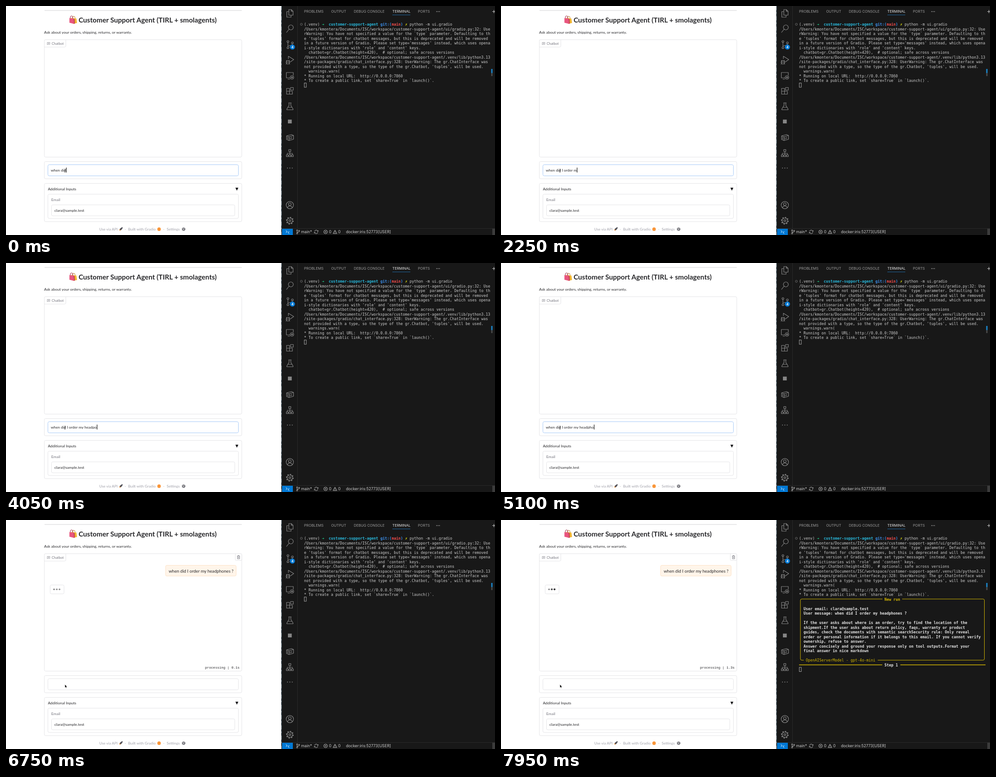
An HTML page that plays this animation: 1091x513 px, repeating every 8 s.

```html
<!DOCTYPE html>
<html lang="en">
<head>
<meta charset="utf-8">
<title>Support agent demo</title>
<style>
  html, body { margin: 0; width: 100%; height: 100%; overflow: hidden; background: #fff; }
  svg { display: block; }
  text { white-space: pre; }
  .page { font: 8.45px Lato, sans-serif; fill: #27272a; }
  .page .muted { fill: #71717a; }
  .page .foot { font-size: 8.3px; fill: #a1a1aa; }
  .box { fill: #fff; stroke: #e4e4e7; }
  .ui { font: 8px Inter, sans-serif; fill: #9d9d9d; }
  .status { font-size: 8.7px; fill: #ccc; }
  .icon { fill: none; stroke: #868686; stroke-width: 1.2; stroke-linejoin: round; stroke-linecap: round; }
  .term { font: 8.32px "DejaVu Sans Mono", monospace; fill: #ccc; }
  .b { font-weight: bold; }
  .white { fill: #e5e5e5; }
  .gold { fill: #d4b702; }
  .green { fill: #23d18b; }
  .cyan { fill: #29b8db; }
  .blue { fill: #3b8eea; }
  .red { fill: #f14c4c; }
  .yellow { fill: #e5e510; }
</style>
</head>
<body>
<svg width="1091" height="513" viewBox="0 0 1091 513">
  <rect width="614" height="513" fill="#fff"/>

  <g class="page">
    <path d="M86 10H526" stroke="#d0d0d3"/>
    <g>
      <path d="M148 28v-2a3 3 0 0 1 6 0v2" fill="none" stroke="#b97d1d"/>
      <path d="M145 27l12 1 1.500 10-9 2z" fill="#f2b632"/>
      <path d="M143.500 28v-3a2.800 2.800 0 0 1 5.600 0v4" fill="none" stroke="#9b2c4a"/>
      <path d="M141.500 27l9.500 1.500 1 11.500-10.500-2.500z" fill="#e8557f"/>
      <path d="M151 28.500l2 1 .5 10-1.500.5z" fill="#b52f55"/>
    </g>
    <text class="b" x="162" y="36.700" font-size="15.480">Customer Support Agent (TIRL + smolagents)</text>
    <text x="85" y="61.600">Ask about your orders, shipping, returns, or warranty.</text>

    <rect class="box" x="85.500" y="75.500" width="440.500" height="263" rx="3"/>
    <path class="box" d="M85.500 92V78.500a3 3 0 0 1 3-3h45v13.500a3 3 0 0 1-3 3z"/>
    <path d="M92 81.500h6v4.500h-4.500l-1.500 1zM93.500 83h3M93.500 84.500h3" fill="none" stroke="#8b8b93" stroke-width=".7"/>
    <text class="muted" x="102" y="86.900" font-size="7.500">Chatbot</text>

    <rect class="box" x="85.500" y="348.500" width="440.500" height="38.500" rx="3"/>
    <rect class="box" id="field" x="93.500" y="355.500" width="425" height="25" rx="3"/>
    <g id="typing">
      <text id="typed" x="100" y="371" font-size="8.360"></text>
      <rect id="caret" y="362" width="1.100" height="11" fill="#000"/>
      <path d="M130 365q1.500 0 1.500 1.200v5.600q0 1.200-1.500 1.200M133 365q-1.500 0-1.500 1.200v5.600q0 1.200 1.500 1.200M130.700 369.500h1.600" fill="none" stroke="#333" stroke-width=".6"/>
    </g>

    <rect class="box" x="85.500" y="397.500" width="440.500" height="85.500" rx="3"/>
    <text x="93.500" y="413.200">Additional Inputs</text>
    <path d="M511.800 407h6.600l-3.300 6.800z" fill="#18181b"/>
    <rect class="box" x="93.500" y="421.500" width="425" height="54.500" rx="3"/>
    <text class="muted" x="101" y="437">Email</text>
    <rect class="box" x="101.500" y="445.500" width="409" height="24.500" rx="3"/>
    <text x="108" y="461">clara@sample.test</text>

    <text class="foot" x="208" y="503">Use via API</text>
    <path d="M253 503l1-4 4-3 2.500-.5-.5 2.500-3 4z" fill="#55555c"/>
    <path d="M253 503l.5-3 2.500 2.500z" fill="#f08a24"/>
    <text class="foot" x="265" y="503">·</text>
    <text class="foot" x="272.500" y="503">Built with Gradio</text>
    <circle cx="341.500" cy="500" r="3.900" fill="#f9963a"/>
    <text class="foot" x="351" y="503">·</text>
    <text class="foot" x="358.500" y="503">Settings</text>
    <circle cx="396.300" cy="500" r="3.400" fill="none" stroke="#66666d" stroke-width="1.300" stroke-dasharray="1.600 1.070"/>
    <circle cx="396.300" cy="500" r="2" fill="none" stroke="#66666d" stroke-width="1.700"/>

    <g id="chat">
      <rect class="box" x="511.500" y="75.500" width="14.500" height="15" rx="2"/>
      <path d="M515.500 80.800h6.500M517.500 80.500v-1h2.500v1M516.300 81v6h5v-6M518 82.500v3M519.700 82.500v3" fill="none" stroke="#71717a" stroke-width=".8"/>
      <rect x="356" y="101.500" width="157.500" height="24" rx="3" fill="#fff5ea" stroke="#fde2c6"/>
      <text x="363" y="118.300" font-size="9.620">when did I order my headphones ?</text>
      <rect class="box" x="98.500" y="145.500" width="31" height="20" rx="3"/>
      <g id="dots" fill="#27272a">
        <circle cx="107.200" cy="155.300" r="2"/><circle cx="113.300" cy="155.300" r="2"/><circle cx="119.400" cy="155.300" r="2"/>
      </g>
      <text id="timer" x="521" y="333" text-anchor="end" style="font:7.550px 'Liberation Mono',monospace"></text>
      <path d="M131.500 368.500v7l1.600-1.400 1 2.300 1.100-.5-1-2.200h2.100z" fill="#000" stroke="#fff" stroke-width=".4"/>
    </g>
  </g>

  <rect x="614" width="477" height="513" fill="#181818"/>
  <path d="M615 0V513" stroke="#2a343a" stroke-width="2"/>
  <path d="M614.500 0V513" stroke="#7d878c" stroke-dasharray="9 5 3 6"/>
  <path d="M650.500 0V498.500M616 498.500H1091" stroke="#2b2b2b" fill="none"/>

  <g class="icon">
    <path d="M631 8h5.500l4 4v8.500H631zM636.500 8v4h4M631 12.500h-4.500V25h9.500v-4.500"/>
    <path d="M632 51.500L626 59M641 48a5.500 5.500 0 1 1-11 0a5.500 5.500 0 1 1 11 0"/>
    <path d="M629 82v8M639 84.500q0 4-5 4t-5 3M631 79.500a2 2 0 1 1-4 0a2 2 0 1 1 4 0M631 93.500a2 2 0 1 1-4 0a2 2 0 1 1 4 0M641 82.500a2 2 0 1 1-4 0a2 2 0 1 1 4 0"/>
    <path d="M630 118v-5.500l12 7.500-8 5.500M625.500 125.500a3.500 3.500 0 0 1 7 0v1a3.500 3.500 0 0 1-7 0zM625.500 122l1.500 1.500M632.500 122l-1.500 1.500M624.500 126h8.500M625 130l1.500-1.500M633 130l-1.500-1.500"/>
    <path d="M633 161h-7.500v-12h15.500v6M629 164h4M642 160a4 4 0 1 1-8 0a4 4 0 1 1 8 0M636.500 158.500l1.300 1.500-1.300 1.500M639.800 158.500l-1.300 1.500 1.300 1.500"/>
    <path d="M626 184.500h6.500v13H626zM626 191h13v6.500h-13M635 182.500h6v6h-6z"/>
    <path d="M630.500 217h6M631.500 217v5.500l-5 8.500q-.5 1.500 1 1.500h12q1.500 0 1-1.500l-5-8.500V217M629 227h9"/>
    <path d="M626 291l11-3 4.500 2v8.500l-10 3-5.500-2.500zM626 291l5.500 2 10-3M631.500 293v8.500M628.500 294v4M634 295v3.500M637 294v3.500"/>
    <path d="M631 321.500h4.500v4.500H631zM625.500 333.500h4v4h-4zM631.300 333.500h4v4h-4zM637 333.500h4v4h-4zM633.300 326v7.500M627.500 333.500v-3.500H639v3.500"/>
    <path d="M641.500 446a8.200 8.200 0 1 1-16.400 0a8.200 8.200 0 1 1 16.400 0M636.300 444a3 3 0 1 1-6 0a3 3 0 1 1 6 0M628 452q1-4 5.300-4t5.300 4"/>
    <circle cx="633.300" cy="481" r="2.200"/>
    <circle cx="633.300" cy="481" r="6"/>
    <circle cx="633.300" cy="481" r="7.500" stroke-width="2" stroke-dasharray="2.800 3.090" stroke-linecap="butt"/>
  </g>
  <rect x="629" y="254.500" width="8.500" height="8.500" fill="#868686"/>
  <g fill="#868686"><circle cx="628" cy="363" r="1"/><circle cx="633.300" cy="363" r="1"/><circle cx="638.600" cy="363" r="1"/></g>
  <circle cx="639" cy="92" r="5.800" fill="#0078d4"/>

  <g class="ui">
    <text class="b" x="639" y="94.700" font-size="7" text-anchor="middle" style="fill:#fff">4</text>
    <text x="665" y="15">PROBLEMS</text>
    <text x="725.500" y="15">OUTPUT</text>
    <text x="776" y="15">DEBUG CONSOLE</text>
    <text x="862" y="15" style="fill:#e7e7e7">TERMINAL</text>
    <text x="919" y="15">PORTS</text>
    <path d="M862 20H902" stroke="#1f6ba5"/>
    <path d="M960 12.500h1.400M963.300 12.500h1.400M966.600 12.500h1.400" stroke="#ccc" stroke-width="1.400"/>
    <path d="M1085 12.500h6M1088.500 9v7" stroke="#ccc"/>
    <rect x="616" y="499" width="24" height="14" fill="#0078d4"/>
    <rect x="1085" y="499" width="6" height="14" fill="#3c3c3c"/>
    <path d="M624.500 503l3 2.500-3 2.500M632 505l-3 2.500 3 2.500" fill="none" stroke="#fff"/>
    <g fill="none" stroke="#ccc" stroke-width=".9">
      <path d="M649.500 503.500v5M654 505q0 2-4.500 2.500"/>
      <circle cx="649.500" cy="502.500" r="1.300"/><circle cx="649.500" cy="509.500" r="1.300"/><circle cx="654" cy="503.700" r="1.300"/>
      <path d="M688.500 505a3.700 3.700 0 0 1 7-.8M695.700 507a3.700 3.700 0 0 1-7 .8M694 504.800h2.500v-2M690.300 507.200h-2.500v2"/>
      <circle cx="713" cy="506" r="4"/>
      <path d="M711.500 504.500l3 3M714.500 504.500l-3 3M734 502l4.200 7.700h-8.400zM734 504.800v2.300M734 508v.8"/>
    </g>
    <g class="status">
      <text x="658.500" y="509.200">main*</text>
      <text x="720.500" y="509.200">0</text>
      <text x="741" y="509.200">0</text>
      <text x="758.500" y="509.200">docker:iris:52773[USER]</text>
    </g>
  </g>

  <circle cx="659" cy="41" r="2.300" fill="none" stroke="#777" stroke-width=".9"/>
  <rect x="1082.500" y="141" width="3" height="9.500" fill="#1a85c9"/>
  <rect x="1082.500" y="150.500" width="3" height="6.500" fill="#4a4a4a"/>
  <g class="term" id="log"></g>
  <g class="term" id="run">
    <g fill="none" stroke="#d4b702">
      <path d="M851 177H671a3 3 0 0 0-3 3V311a3 3 0 0 0 3 3H675.500M895 177H1075.500a3 3 0 0 1 3 3V311a3 3 0 0 1-3 3H840.500"/>
      <path d="M665 324.500H850.500M891 324.500H1081" stroke-width="1.700"/>
    </g>
  </g>
  <rect id="cursor" x="665.500" width="4.500" height="9.500" fill="none" stroke="#b5b5b5" stroke-width=".9"/>
</svg>
<script>
const $ = id => document.getElementById(id);
const COL = 5.01, ROW = 10.5;

function print(parent, row, col, str, cls = '') {
  const el = document.createElementNS('http://www.w3.org/2000/svg', 'text');
  el.setAttribute('x', 665 + col * COL);
  el.setAttribute('y', 44 + row * ROW);
  el.setAttribute('class', cls);
  el.textContent = str;
  parent.append(el);
}

[[0, '(.venv)'], [8, '➜', 'b green'], [11, 'customer-support-agent', 'b cyan'],
 [34, 'git:(', 'b blue'], [39, 'main', 'b red'], [43, ')', 'b blue'],
 [45, '✗', 'b yellow'], [47, 'python -m ui.gradio']
].forEach(part => print($('log'), 0, ...part));

`/Users/kmontera/Documents/ISC/workspace/customer-support-agent/ui/gradio.py:32: Use
rWarning: You have not specified a value for the \`type\` parameter. Defaulting to th
e 'tuples' format for chatbot messages, but this is deprecated and will be removed
in a future version of Gradio. Please set type='messages' instead, which uses opena
i-style dictionaries with 'role' and 'content' keys.
  chatbot=gr.Chatbot(height=420),  # optional; safe across versions
/Users/kmontera/Documents/ISC/workspace/customer-support-agent/.venv/lib/python3.13
/site-packages/gradio/chat_interface.py:328: UserWarning: The gr.ChatInterface was
not provided with a type, so the type of the gr.Chatbot, 'tuples', will be used.
  warnings.warn(
* Running on local URL:  http://0.0.0.0:7860
* To create a public link, set \`share=True\` in \`launch()\`.`
  .split('\n').forEach((line, i) => print($('log'), i + 1, 0, line));

`User email: clara@sample.test
User message: when did I order my headphones ?

If the user asks about where is an order, try to find the location of the
shipment.If the user asks about return policy, faqs, warranty or product
guides, check the documents with semantic searchSecurity rule: Only reveal
order or personal information if it belongs to this email. If you cannot verify
ownership, refuse to answer.
Answer concisely and ground your response only on tool outputs.Format your
final answer in nice markdown`
  .split('\n').forEach((line, i) => print($('run'), i + 15, 2, line, 'b white'));
print($('run'), 13, 38, 'New run', 'b gold');
print($('run'), 26, 3, 'OpenAIServerModel - gpt-4o-mini', 'gold');
print($('run'), 27, 38, 'Step 1', 'b white');

// time, text after "when did", caret opacity
const order = ' I order my head';
const keys = [
  [0, ''], [150, '', .5], [300, '', 0], [600, ''], [750, ' '], [900, ' I'], [1050, ' I '],
  [1200, ' I o'], [1350, ' I or'], [1500, ' I ord'], [1650, ' I order '],
  [2250, ' I order m'], [2400, ' I order my'], [2550, ' I order my '], [2700, ' I order my he'],
  [2850, order], [3300, order + 'pohn'], [3450, order + 'pohnes'], [3600, order + 'pohnes', 0],
  [4050, order + 'po'], [4200, order + 'p'], [4350, order + 'p', .5], [4500, order + 'p', 0],
  [4650, order + 'p'], [4950, order + 'ph'], [5100, order + 'pho'], [5250, order + 'phon'],
  [5400, order + 'phone'], [5550, order + 'phones'], [5700, order + 'phones', .5],
  [5850, order + 'phones', 0], [6000, order + 'phones', .5], [6150, order + 'phones'],
  [6300, order + 'phones '], [6450, order + 'phones ?']
];
const SENT = 6600, REPLY = 6900, STEP = 150;
const show = (id, on) => $(id).setAttribute('visibility', on ? 'visible' : 'hidden');

function draw() {
  const t = Math.floor(performance.now() % 8000 / STEP) * STEP;
  const sent = t >= SENT, replied = t >= REPLY;
  show('typing', !sent);
  show('chat', sent);
  show('run', replied);
  $('cursor').setAttribute('y', replied ? 330 : 172.5);
  $('field').style.stroke = sent ? '' : '#a5c8f7';

  const [, tail, opacity = 1] = keys.findLast(k => k[0] <= t);
  $('typed').textContent = 'when did' + tail;
  $('caret').setAttribute('x', 100.3 + $('typed').getComputedTextLength());
  $('caret').setAttribute('opacity', opacity);

  $('timer').textContent = `processing | ${(Math.max(0, Math.floor((t - 6640) / 100)) / 10).toFixed(1)}s`;
  [...$('dots').children].forEach((dot, i) => {
    const phase = Math.max(0, (t - SENT) / 1500 - i * .22);
    const pulse = (1 - Math.cos(phase * 2 * Math.PI)) / 2;
    dot.setAttribute('opacity', .5 + .45 * pulse);
    dot.setAttribute('r', 1.9 + .25 * pulse);
  });
  requestAnimationFrame(draw);
}
draw();
</script>
</body>
</html>
```
